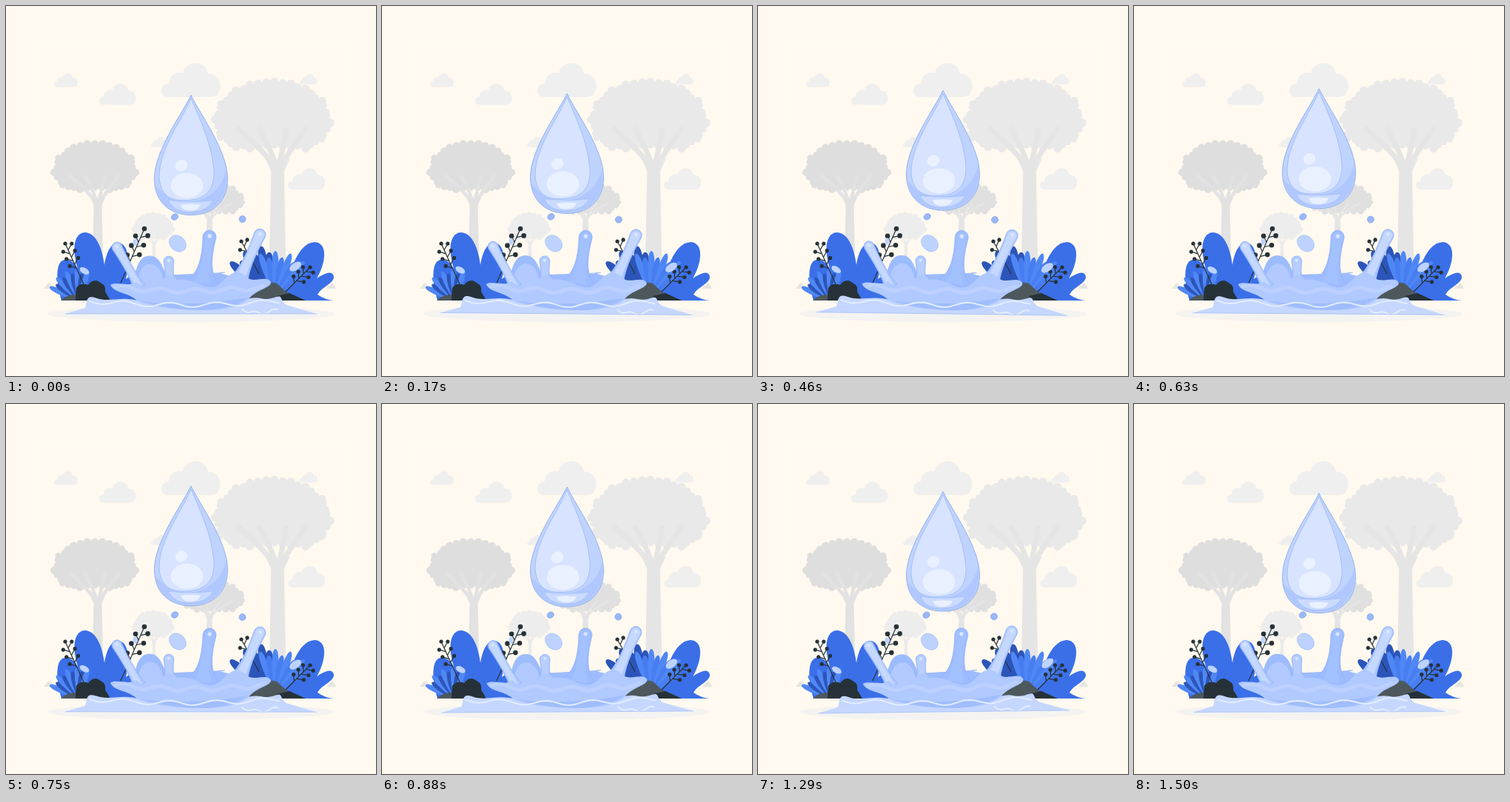
Animation, 500 px wide and 500 px high, one loop 1.54 s. Source, as an HTML page:

```html
<!DOCTYPE html>
<html lang="en">
<head>
<meta charset="utf-8">
<title>Water drop</title>
<style>
html, body { margin: 0; width: 100%; height: 100%; overflow: hidden; background: #fff9ef; }
svg { display: block; width: 100%; height: 100%; }
</style>
</head>
<body>
<svg viewBox="0 0 500 500">
  <path fill="none" stroke="#fffcf6" d="M37 340V55H244V340M252 378V55H462V378"/>
  <g id="clouds" fill="#efefef"></g>
  <g id="trees"></g>

  <ellipse cx="250" cy="416" rx="194" ry="11" fill="#f4f3f1"/>
  <path fill="#e5e5e0" d="M51 382L58 374L67 382ZM433 382L441 374L446 382Z"/>

  <g fill="#3a6fe8">
    <path d="M75 398C67 370 67 345 79 343Q89 341 97 355C88 326 93 307 106 306C124 306 131 333 133 350C136 333 141 321 151 320C166 320 168 346 162 369Q187 350 200 362V398Z"/>
    <path d="M372 398C383 360 394 320 417 319C436 320 432 348 420 368Q441 354 443 366C443 375 426 380 421 390Q431 397 443 398Z"/>
  </g>
  <g id="leaves"></g>
  <g id="branches" fill="#263238" stroke="#263238" stroke-width="1.2"></g>

  <path fill="#4d585c" d="M74 398Q82 389 98 390L112 398ZM318 398L340 381Q352 371 366 375L378 386L405 398Z"/>
  <path fill="#263238" d="M94 398L95 381Q100 373 111 377Q119 366 129 375Q135 377 134 386L141 398ZM366 392L383 388L405 398H370Z"/>

  <g id="splash">
    <path fill="#c5d7ff" d="M80 416L107 408C110 400 107 389 123 395S159 391 181 399S253 408 280 407S327 391 344 395S369 388 372 395Q374 401 379 404L420 416Z"/>
    <path fill="#9dbcff" stroke="#8cadf5" stroke-width=".6" d="M172 382C175 353 180 338 194 338S210 352 217 364T262 362T292 360T325 370V385Z"/>
    <path fill="#b2caff" d="M178 382C174 340 214 335 213 382Z"/>
    <g id="jets"></g>
    <path fill="#b0c9ff" d="M141 377C150 371 162 381 176 373Q194 389 212 370Q221 357 231 370Q247 368 264 377T296 369T326 367C335 375 352 363 358 373C359 381 338 383 328 396C313 409 287 411 264 411C232 411 198 407 178 399C165 386 147 389 141 377Z"/>
    <path id="rim" fill="none" stroke="#c5d8ff" stroke-width="5" stroke-linecap="round" opacity=".6"/>
    <path fill="#a0bdfc" d="M181 399Q250 408 328 394Q304 411 263 411T181 399Z"/>
    <path id="ripple" fill="none" stroke="#e3edff" stroke-width="2" stroke-linecap="round"/>
    <path fill="none" stroke="#95b4f5" stroke-width=".6" d="M80 416H420"/>
    <g fill="#9ab8f8" stroke="#7fa2ec" stroke-width=".7">
      <ellipse cx="228" cy="285" rx="4.8" ry="4" transform="rotate(-30 228 285)"/>
      <circle cx="319.5" cy="288" r="4.5"/>
    </g>
    <g fill="#bdd2ff">
      <ellipse cx="232" cy="321" rx="12.5" ry="10" transform="rotate(42 232 321)" stroke="#a4c0fc" stroke-width=".7"/>
      <ellipse cx="106" cy="358" rx="7" ry="4" transform="rotate(30 106 358)"/>
      <ellipse cx="391" cy="352" rx="9" ry="5" transform="rotate(-35 391 352)"/>
      <ellipse cx="174.5" cy="319" rx="3" ry="4.5"/>
    </g>
  </g>

  <g id="drop">
    <path fill="#bfd3ff" stroke="#8dace9" stroke-width=".9" d="M250 0C238 25 200.500 75 200.500 113C200.500 145 222 162 250 162S299.500 145 299.500 113C299.500 75 262 25 250 0Z"/>
    <path fill="#b0c8ff" d="M202 122Q225 148 250 144Q289 138 298 100C303 142 278 161 250 161S206 147 202 122Z"/>
    <path fill="#d7e3ff" stroke="#9bb8f4" stroke-width=".8" d="M250 4C240 30 207 72 207 110C208 132 219 141 235 142C267 144 281 131 281 105C280 69 260 28 250 4Z"/>
    <path fill="#cadbff" stroke="#9bb8f4" stroke-width=".6" d="M219 142Q250 146 280 142Q273 157 250 158T219 142Z"/>
    <g fill="#e9f0ff">
      <ellipse cx="244.500" cy="122" rx="22" ry="17"/>
      <ellipse cx="237" cy="95" rx="8.500" ry="7.500" transform="rotate(-30 237 95)"/>
      <path d="M236 148Q250 146 263 148Q260 156 249 156T236 148Z"/>
    </g>
  </g>
</svg>
<script>
const TAU = 2 * Math.PI;
const el = id => document.getElementById(id);
const add = (id, markup) => el(id).insertAdjacentHTML('beforeend', markup);
const range = n => Array.from({ length: n }, (_, i) => i);
const mix = (a, b, k) => a + (b - a) * k;

function cloud(x, y, scale) {
  add('clouds', `<path transform="translate(${x} ${y}) scale(${scale})"
    d="M9 46C-3 46-3 28 10 28C10 17 20 11 29 14C32-4 60-5 63 15C76 13 83 28 78 38Q76 46 66 46Z"/>`);
}

// Scalloped crown with a flat base, arched in the middle, over a forked trunk.
function tree(x, y, rx, ry, bump, crown, wood, trunkX, trunkWidth, ground) {
  const count = Math.round(TAU * Math.sqrt(rx * ry) / bump);
  const points = range(count).map(i => {
    const angle = i / count * TAU;
    const wobble = 1 + .035 * Math.sin(i * 2.4);
    const s = Math.sin(angle);
    const dy = s > 0 ? s ** .75 - .3 * s ** 10 : s;
    return [x + rx * wobble * Math.cos(angle), y + ry * wobble * dy];
  });
  const r = bump * .56;
  const outline = points.map(p => `A${r} ${r} 0 0 1 ${p}`).join('');
  const fork = y + ry * 1.25;
  const limbs = [-.62, -.25, .25, .6].map(side =>
    `M${trunkX} ${fork + ry * .2}Q${trunkX + side * ry * .5} ${fork - ry * .3} ${x + side * rx} ${y + ry * .25}`).join('');
  const w = trunkWidth / 2;
  add('trees', `<path fill="${crown}" d="M${points[count - 1]}${outline}Z"/>
    <path fill="none" stroke="${wood}" stroke-width="${w * .65}" d="${limbs}"/>
    <path fill="${wood}" d="M${trunkX - w} ${ground}L${trunkX - w * .8} ${fork + ry * .2}L${trunkX - w * 1.5} ${fork - ry * .15}
      L${trunkX} ${fork}L${trunkX + w * 1.5} ${fork - ry * .15}L${trunkX + w * .8} ${fork + ry * .2}L${trunkX + w} ${ground}Z"/>`);
}

function fan(x, y, from, to, count, length, width, fills) {
  for (const i of range(count)) {
    const l = length * (1 - .13 * (i % 2));
    add('leaves', `<path transform="translate(${x} ${y}) rotate(${mix(from, to, i / (count - 1))})"
      fill="${fills[i % fills.length]}"
      d="M0 0C${l * .45} ${-width} ${l} ${-width} ${l} 0S${l * .45} ${width} 0 0"/>`);
  }
}

// Berries alternate along the stem, with one at its end.
function branch(x0, y0, x1, y1, count, r) {
  const length = Math.hypot(x1 - x0, y1 - y0);
  const ux = (x1 - x0) / length, uy = (y1 - y0) / length;
  const twigs = range(count).map(i => {
    const at = length * mix(.4, .84, i / (count - 1));
    const side = i % 2 ? 8 : -7;
    return [x0 + ux * at, y0 + uy * at, x0 + ux * (at + 6) - uy * side, y0 + uy * (at + 6) + ux * side];
  });
  twigs.push([x0, y0, x1, y1]);
  for (const [ax, ay, bx, by] of twigs) {
    add('branches', `<path d="M${ax} ${ay}L${bx} ${by}"/><circle cx="${bx}" cy="${by}" r="${r}" stroke="none"/>`);
  }
}

// A column of water: round tip, narrow neck, flared foot.
function jet(x, y, footX, footY, r, foot, fill, shine) {
  const l = Math.hypot(footX - x, footY - y);
  const angle = Math.atan2(footY - y, footX - x) * 360 / TAU;
  const shape = (r, foot) => `M${l} ${-foot}C${l * .8} ${-r * .7} ${l * .4} ${-r * .7} 0 ${-r}
    A${r} ${r} 0 0 0 0 ${r}C${l * .4} ${r * .7} ${l * .8} ${r * .7} ${l} ${foot}Z`;
  add('jets', `<g transform="translate(${x} ${y}) rotate(${angle})">
    <path d="${shape(r, foot)}" fill="${fill}" stroke="#8cadf5" stroke-width=".6"/>
    <path d="${shape(r * .75, foot * .5)}" fill="${shine}"/>
    <circle cx="-1" r="${r * .3}" fill="#d8e5ff"/></g>`);
}

function wave(from, to, y, height, length) {
  return range(Math.floor((to - from) / 4) + 1).map(i => {
    const sag = 5 * Math.sin(Math.PI * i * 4 / (to - from));
    return `${i ? 'L' : 'M'}${from + i * 4} ${y + sag - height * Math.sin(i * 4 / length * TAU)}`;
  }).join('');
}

cloud(65, 91, .4);
cloud(126, 105, .62);
cloud(210, 77, 1);
cloud(397, 92, .3);
cloud(381, 219, .63);
cloud(196, 177, .3);

tree(120, 220, 55, 34, 8, '#dedede', '#e2e2e2', 124, 14, 345);
tree(360, 152, 77, 49, 9, '#e9e9e9', '#e5e5e5', 367, 22, 345);
tree(280, 262, 41, 19, 7, '#e0e0e0', '#e5e5e5', 275, 9, 315);
tree(199, 299, 26, 17, 6, '#ededed', '#ebebeb', 200, 5, 342);

const dark = '#2c55b9', light = '#4f87f5';
fan(98, 398, -155, -72, 9, 43, 5, [light, dark]);
fan(352, 390, -138, -86, 6, 66, 8, [dark]);
fan(364, 392, -110, -40, 8, 61, 6, [light, '#477df0']);

branch(105, 376, 80, 321, 6, 2.6);
branch(155, 374, 187, 301, 6, 3.3);
branch(342, 362, 318, 318, 4, 2.6);
branch(375, 389, 411, 353, 6, 2.6);

jet(275, 312, 266, 376, 9, 25, '#9dbcff', '#a3c0ff');
jet(220, 345, 221, 378, 7, 14, '#acc7ff', '#b7ceff');
jet(150, 326, 181, 381, 7, 9, '#acc7ff', '#c5d8ff');
jet(343, 309, 313, 376, 8, 16, '#acc7ff', '#c5d8ff');

el('rim').setAttribute('d', wave(148, 350, 380, 3, 48));
el('ripple').setAttribute('d', wave(113, 369, 399, -3, 62) + wave(319, 367, 410, -2, 24));

const LOOP = 1540;
function draw(now) {
  const turn = TAU * now / LOOP;
  // Nearly constant speed, softened at both ends.
  const bob = Math.asin(.96 * Math.cos(turn + .12)) / Math.asin(.96);
  el('drop').setAttribute('transform', `translate(0 ${115.7 + 4.9 * bob})`);
  el('splash').setAttribute('transform', `rotate(${.8 * Math.sin(turn)} 250 330)`);
  requestAnimationFrame(() => draw(performance.now() % LOOP));
}
draw(0);
</script>
</body>
</html>
```
